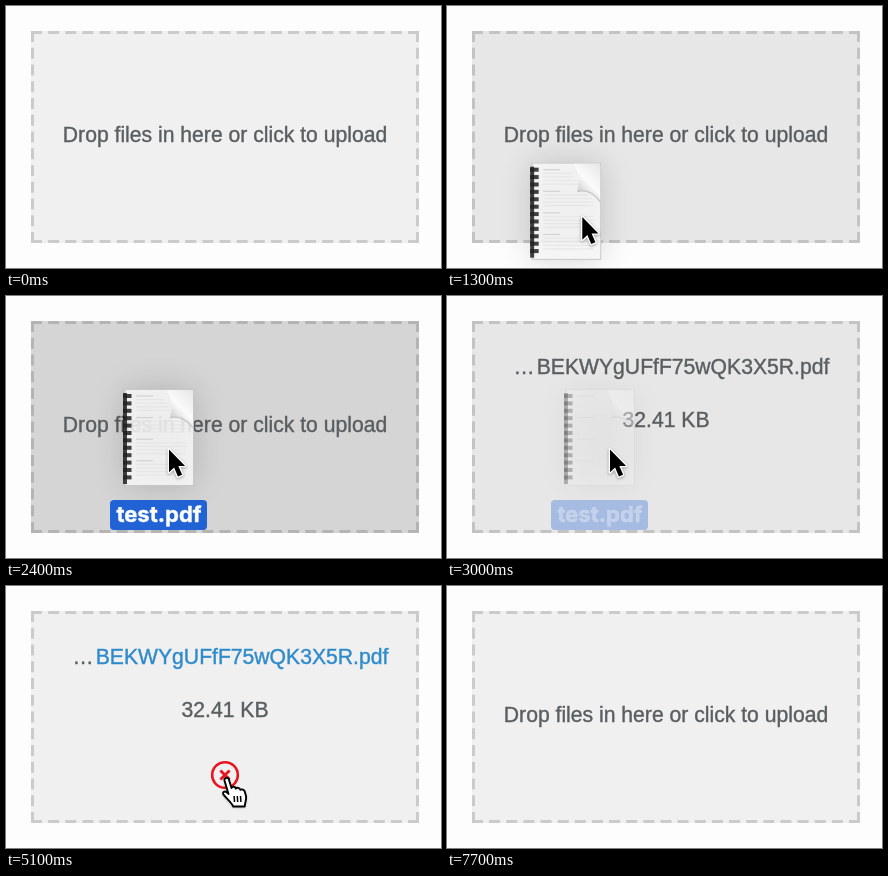
An HTML page with a canvas for the animation above (9100 ms loop, 435x262 px).

```html
<!DOCTYPE html>
<html lang="en">
<head>
<meta charset="utf-8">
<title>File drop zone</title>
<style>
  html, body { margin: 0; width: 100%; height: 100%; overflow: hidden; background: #fdfdfd; }
  canvas { display: block; width: 435px; height: 262px; }
</style>
</head>
<body>
<canvas id="stage"></canvas>
<script>
const W = 435, H = 262, LOOP = 9100, STEP = 100;
const DROP = 2800, SWAP = 3000, DONE = 3900, CLICK = 5500, RELEASE = 5900, RESET = 6500, EXIT = 7700;
const ZONE = { x: 25, y: 25, w: 388, h: 212, mid: 219 };
const FONT = '21.15px "Liberation Sans", Arial, sans-serif';
const LABEL_FONT = '700 22px Inter, "Liberation Sans", sans-serif';
const INK = '#5a5e61', LINK = '#2e8acb';

const canvas = document.getElementById('stage');
const ctx = canvas.getContext('2d');
const dpr = window.devicePixelRatio || 1;
canvas.width = W * dpr;
canvas.height = H * dpr;

const ramp = (t, from, to) => Math.min(1, Math.max(0, (t - from) / (to - from)));
const easeOut = k => 1 - (1 - k) ** 2;
const smooth = k => k * k * (3 - 2 * k);
const mix = (a, b, k) => a + (b - a) * k;
const gray = v => `rgb(${v},${v},${v})`;

function line(x1, y1, x2, y2) {
  ctx.beginPath();
  ctx.moveTo(x1, y1);
  ctx.lineTo(x2, y2);
  ctx.stroke();
}

function text(str, x, y, color, align = 'center', font = FONT) {
  ctx.font = font;
  ctx.textAlign = align;
  ctx.fillStyle = ctx.strokeStyle = color;
  ctx.lineWidth = 0.4;
  ctx.fillText(str, x, y);
  ctx.strokeText(str, x, y);
}

function shadow(alpha, blur, y = 0) {
  ctx.shadowColor = `rgba(0,0,0,${alpha})`;
  ctx.shadowBlur = blur * dpr;
  ctx.shadowOffsetY = y * dpr;
}

// Dashes are fitted so that each side begins and ends with a full dash.
function dashedSide(x1, y1, x2, y2) {
  const len = Math.hypot(x2 - x1, y2 - y1), dash = 11;
  const count = Math.round((len - dash) / 17);
  ctx.setLineDash([dash, (len - dash) / count - dash]);
  line(x1, y1, x2, y2);
}

function drawZone(dark) {
  const { x, y, w, h } = ZONE;
  ctx.fillStyle = gray(Math.round(mix(240, 213, dark)));
  ctx.fillRect(x, y, w, h);
  ctx.strokeStyle = gray(Math.round(mix(203, 180, dark)));
  ctx.lineWidth = 3;
  for (const side of [1.5, h - 1.5]) dashedSide(x, y + side, x + w, y + side);
  for (const side of [1.5, w - 1.5]) dashedSide(x + side, y, x + side, y + h);
  ctx.setLineDash([]);
}

function drawPage() {
  const w = 71, h = 97, fold = w - 27;
  ctx.save();
  shadow(0.2, 32);
  ctx.fillStyle = '#f8f8f8';
  ctx.fillRect(2, 0, w - 2, h);
  ctx.restore();
  ctx.strokeStyle = '#b4b4b4';
  ctx.lineWidth = 0.8;
  ctx.strokeRect(2, 0.4, w - 2.4, h - 0.8);

  // Faint rows of writing in paragraphs
  for (let i = 0; i < 24; i++) {
    if (i % 6 === 5) continue;
    const head = i % 6 === 0, y = 7 + i * 3.6;
    ctx.strokeStyle = gray(head ? 205 : 228);
    ctx.lineWidth = 1.2;
    line(13, y, 13 + (head ? 17 : Math.min(50, 25 + i * 3)), y);
  }

  // Turned corner
  const shade = ctx.createLinearGradient(fold, 27, w, 0);
  shade.addColorStop(0, '#c2c2c2');
  shade.addColorStop(0.4, '#fdfdfd');
  shade.addColorStop(1, '#e2e2e2');
  ctx.fillStyle = shade;
  ctx.fill(new Path2D(`M${fold} 1q7 13 3 28q13-4 23 10V1Z`));
  ctx.strokeStyle = '#c0c0c0';
  ctx.stroke(new Path2D(`M${fold + 3} 29q13-4 23 10`));

  // Spiral binding
  ctx.fillStyle = '#222';
  ctx.fillRect(0, 4, 4, h - 6);
  for (let y = 5; y < h - 4; y += 7.4) ctx.fillRect(0, y, 8.5, 4);
}

function drawDoc(x, y, alpha) {
  ctx.save();
  ctx.translate(x, y);
  ctx.globalAlpha = alpha * 0.85;
  drawPage();
  ctx.globalAlpha = alpha;
  ctx.fillStyle = '#2163d4';
  ctx.beginPath();
  ctx.roundRect(-13, 111, 97, 30, 4);
  ctx.fill();
  text('test.pdf', 36, 133, '#fff', 'center', LABEL_FONT);
  ctx.restore();
}

const ARROW = new Path2D('M0 0V21.5L4.8 17L8.4 25.5L12.4 23.8L8.8 15.5H15.2Z');
const HAND = new Path2D('M0 3C-.6 0 3.6-.8 4.4 2L7 10.5C7.5 8.6 11 9 11.3 11.2' +
  'C12.4 9.6 15.4 10.4 15.8 12.4C17 11.4 19.8 12 20.4 14.4L21.6 19' +
  'C22 22 20.6 24.6 20.2 29H8.6C7.8 25.6 3.4 22.6-1 17.2C-2.6 14.6 .4 13.2 2.2 14.8L4 16.4Z');

function drawArrow(x, y) {
  ctx.save();
  ctx.translate(x + 1, y + 1.5);
  ctx.scale(1.06, 1.06);
  shadow(0.35, 3, 1);
  ctx.lineWidth = 2.6;
  ctx.lineJoin = 'round';
  ctx.strokeStyle = '#fff';
  ctx.stroke(ARROW);
  shadow(0, 0);
  ctx.fillStyle = '#000';
  ctx.fill(ARROW);
  ctx.restore();
}

function drawHand(x, y) {
  ctx.save();
  ctx.translate(x + 0.5, y + 0.5);
  shadow(0.3, 3, 1);
  ctx.fillStyle = '#fff';
  ctx.fill(HAND);
  shadow(0, 0);
  ctx.strokeStyle = '#000';
  ctx.lineWidth = 1.9;
  ctx.lineJoin = 'round';
  ctx.stroke(HAND);
  ctx.lineWidth = 1.5;
  for (let i = 0; i < 3; i++) line(9.6 + i * 3.2, 18.5, 10 + i * 3.2, 24.5);
  ctx.restore();
}

function drawRemove(alpha) {
  ctx.save();
  ctx.globalAlpha = alpha;
  ctx.translate(ZONE.mid, 189);
  ctx.strokeStyle = '#e8141f';
  ctx.lineWidth = 2.6;
  ctx.beginPath();
  ctx.arc(0, 0, 12.8, 0, Math.PI * 2);
  ctx.stroke();
  ctx.lineWidth = 2.8;
  for (const s of [-1, 1]) line(-4.6, -4.6 * s, 4.6, 4.6 * s);
  ctx.restore();
}

function drawFile(t) {
  const done = t >= DONE;
  text('…', 66.5, 78, INK, 'left');
  text('BEKWYgUFfF75wQK3X5R.pdf', 382.3, 78, done ? LINK : INK, 'right');
  text('32.41 KB', ZONE.mid, 131, INK);
  if (done) drawRemove(1 - 0.6 * ramp(t, CLICK, RELEASE));
}

// The document slides in, then is nudged twice before it is let go.
function drawDrag(t) {
  const enter = easeOut(ramp(t, 1000, 1500));
  const nudge = ramp(t, 1700, 2000), settle = ramp(t, 2100, 2400), grip = ramp(t, 1200, 2000);
  const x = 99 * enter + 14 * nudge + 4 * settle;
  const y = 260 - 123 * enter - 29 * nudge - 15 * settle;
  drawDoc(x, y, 1 - ramp(t, DROP, DROP + 300));
  drawArrow(x + 52 - 7 * grip, y + 52 + 7 * grip);
}

function drawPointer(t) {
  const reach = smooth(ramp(t, 4600, 5100)), leave = ramp(t, 7500, 7600);
  const x = mix(162, 218, reach) + 18 * leave;
  const y = mix(152, 191, reach) + 42 * leave;
  const pressing = t >= 5000 && t < RELEASE;
  (pressing ? drawHand : drawArrow)(x, y);
}

function render(time) {
  const t = Math.floor((time % LOOP) / STEP) * STEP;
  ctx.setTransform(dpr, 0, 0, dpr, 0, 0);
  ctx.fillStyle = '#fdfdfd';
  ctx.fillRect(0, 0, W, H);

  drawZone(ramp(t, 1200, 1500) - ramp(t, DROP, DROP + 300));
  if (t >= SWAP && t < RESET) drawFile(t);
  else text('Drop files in here or click to upload', ZONE.mid, 136, INK);

  if (t >= 1100 && t < DROP + 300) drawDrag(t);
  else if (t >= DROP && t < EXIT) drawPointer(t);
}

const start = performance.now();
function tick() {
  render(performance.now() - start);
  requestAnimationFrame(tick);
}
tick();
</script>
</body>
</html>
```
